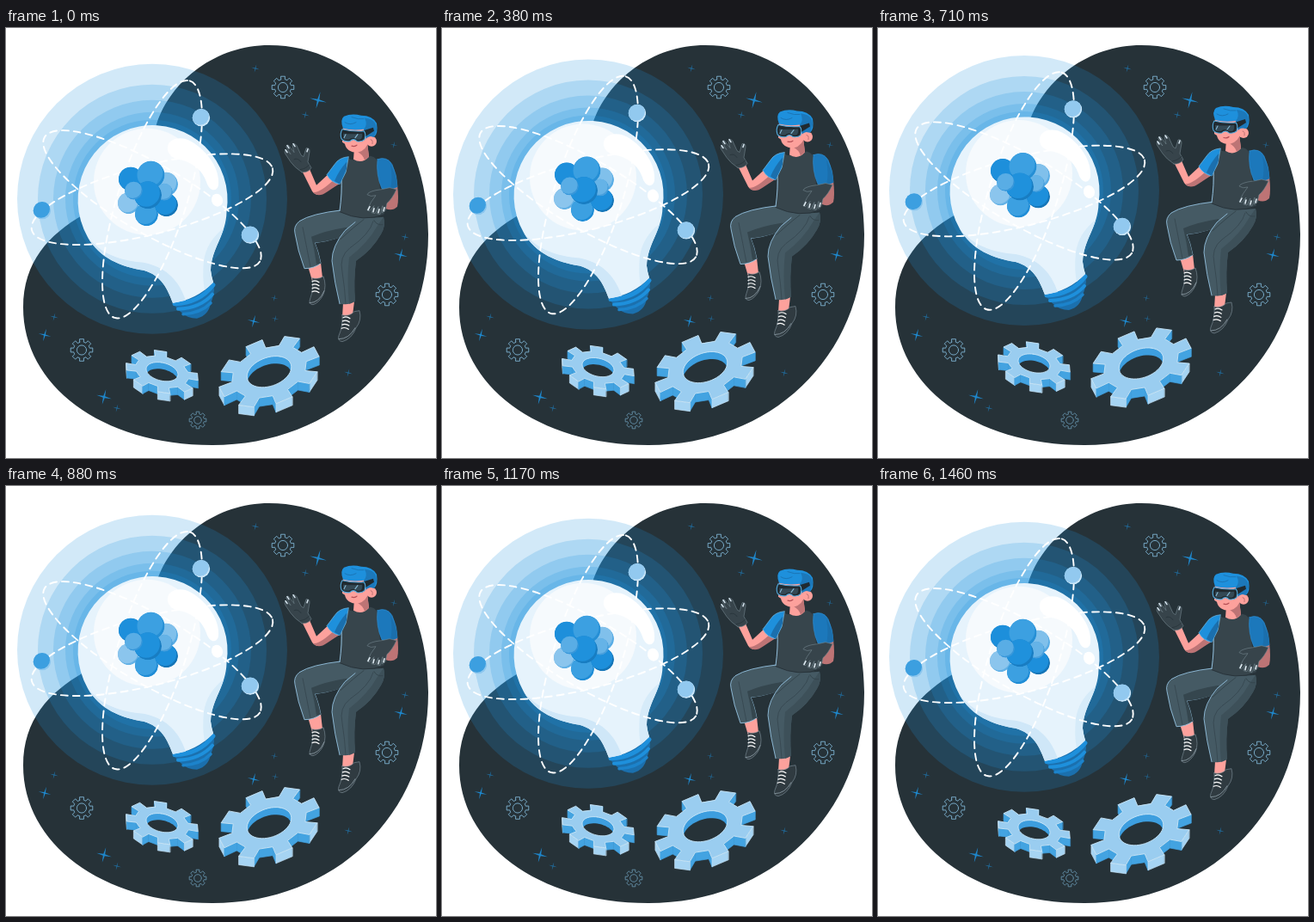
Recreate the animation shown at these times as an HTML page with a canvas. Size 500x500 px, loop 1.5 s.

```html
<!DOCTYPE html>
<html lang="en">
<head>
<meta charset="utf-8">
<title>Floating ideas</title>
<style>
  html, body { margin: 0; width: 100%; height: 100%; overflow: hidden; background: #fff; }
  canvas { display: block; width: 100vw; height: 100vh; }
</style>
</head>
<body>
<canvas id="stage" width="500" height="500"></canvas>
<script>
const ctx = document.getElementById('stage').getContext('2d');
const LOOP = 1500, STEPS = 36, LIFT = 10, BASE = 0.7, TAU = Math.PI * 2;
const DARK = '#263238', BLUE = '#1e90dc', NAVY = '#1b6fad', SKY = '#92c9ef', SKIN = '#fda19c', SKIN_DARK = '#bd7475';
const PANTS = '#455a64', PANTS_DARK = '#35464e', GLOVE = '#37444b', EDGE = '#9fd0f0';

function paint(path, fill, stroke, width = 1) {
  if (fill) { ctx.fillStyle = fill; ctx.fill(path); }
  if (stroke) {
    ctx.strokeStyle = stroke;
    ctx.lineWidth = width;
    ctx.stroke(path);
  }
}
const shape = (d, fill, stroke, width) => paint(new Path2D(d), fill, stroke, width);
const line = (d, stroke, width) => shape(d, null, stroke, width);

function oval(x, y, rx, ry, turn, fill, stroke, width) {
  const path = new Path2D();
  path.ellipse(x, y, rx, ry, turn, 0, TAU);
  paint(path, fill, stroke, width);
}
const disc = (x, y, r, fill, stroke, width) => oval(x, y, r, r, 0, fill, stroke, width);

function polygon(points) {
  const path = new Path2D();
  points.forEach(([x, y]) => path.lineTo(x, y));
  path.closePath();
  return path;
}

// Ball with a crescent of shade on its lower right
function ball(x, y, r, fill, shade) {
  ctx.save();
  ctx.beginPath();
  ctx.arc(x, y, r, 0, TAU);
  ctx.clip();
  disc(x, y, r, shade);
  disc(x - r * 0.13, y - r * 0.16, r, fill);
  ctx.restore();
}

// Gear outline on the unit circle, mapped by the axes a and b
function gearPoints(cx, cy, a, b, root, tipHalf, rootHalf) {
  const points = [];
  for (let i = 0; i < 8; i++) {
    for (const [r, off] of [[root, -rootHalf], [1, -tipHalf], [1, tipHalf], [root, rootHalf]]) {
      const t = i * TAU / 8 + off, c = r * Math.cos(t), s = r * Math.sin(t);
      points.push([cx + a[0] * c + b[0] * s, cy + a[1] * c + b[1] * s]);
    }
  }
  return points;
}

function solidGear(cx, cy, a, b, depth) {
  const points = gearPoints(cx, cy, a, b, 0.74, 0.17, 0.21);
  const walls = points.map((p, i) => ({ p, q: points[(i + 1) % points.length], tip: i % 4 === 1 }))
    .filter(({ p, q }) => q[0] < p[0])
    .sort((u, v) => u.p[1] + u.q[1] - v.p[1] - v.q[1]);
  for (const { p, q, tip } of walls) {
    const wall = polygon([p, q, [q[0], q[1] + depth], [p[0], p[1] + depth]]);
    paint(wall, tip ? '#a6d4f3' : '#43a3e1', tip ? '#c4e2f7' : '#43a3e1', 0.7);
  }
  paint(polygon(points), '#9acdf0', '#c9e6f8', 0.9);

  const hole = new Path2D(), floor = new Path2D();
  for (let i = 0; i < 48; i++) {
    const c = 0.44 * Math.cos(i * TAU / 48), s = 0.44 * Math.sin(i * TAU / 48);
    const x = cx + a[0] * c + b[0] * s, y = cy + a[1] * c + b[1] * s;
    hole.lineTo(x, y);
    floor.lineTo(x, y + depth * 0.85);
  }
  hole.closePath();
  ctx.save();
  ctx.clip(hole);
  paint(hole, '#3d9edf');
  paint(floor, DARK);
  ctx.restore();
  paint(hole, null, '#c9e6f8', 0.9);
}

function lineGear(x, y, r, color) {
  paint(polygon(gearPoints(x, y, [0, -r], [r, 0], 0.74, 0.19, 0.24)), null, color, 0.9);
  disc(x, y, r * 0.43, null, color, 0.9);
}

function sparkle(x, y, r, alpha) {
  ctx.save();
  ctx.translate(x, y);
  ctx.rotate(0.25);
  ctx.scale(r, r);
  ctx.globalAlpha = alpha;
  shape('M0-1L.11-.11 1 0 .11.11 0 1-.11.11-1 0-.11-.11Z', BLUE);
  ctx.restore();
}

function background() {
  ctx.fillStyle = '#fff';
  ctx.fillRect(0, 0, 500, 500);
  shape('M306 20C410 20 491 115 491 240C491 384 381 485 240 485C110 485 20 415 20 325C20 272 50 240 90 217C135 190 160 160 175 112C192 60 245 20 306 20Z', DARK);
  lineGear(322, 69, 13, '#7eb4d3');
  lineGear(443, 310, 13, '#7eb4d3');
  lineGear(88, 374.5, 13, '#7eb4d3');
  lineGear(223, 456, 10, '#648fa8');
  for (const [x, y, r] of [[363, 84, 10], [459, 264, 8], [288, 341, 7.5], [45, 357, 7.5], [114, 429, 9]]) sparkle(x, y, r, 0.9);
  for (const [x, y, r] of [[290, 47, 5], [348, 101, 5], [451, 136, 4.5], [464, 243, 5], [312, 314, 4.5],
    [313, 338, 4.5], [398, 401, 5], [56, 336, 5], [129, 442, 5]]) sparkle(x, y, r, 0.55);
}

function bulb() {
  for (const r of [157, 133, 115, 101, 92]) disc(170, 198, r, 'rgba(30,144,220,.2)');

  shape('M194 317Q221 314 241 293L242 304Q241 313 238 319Q236 333 222 337Q211 337 204 330Q197 325 194 317Z', '#1b70ae');
  line('M196 320Q225 319 241 298', BLUE, 5);
  line('M200 326Q226 325 240 309', BLUE, 4);
  line('M206 332Q226 331 238 319', '#1c83cb', 3.5);

  shape('M95 242.5A87 87 0 1 1 256.5 213C256 240 239 255 238 281Q239 289 241 295Q222 315 194 319C188 303 181 287 160 281C134 277 109 267 95 242.5Z', '#e6f3fc');
  shape('M95 242.5C110 262 134 270 160 272C184 277 200 290 209 316L194 319C188 303 181 287 160 281C134 277 109 267 95 242.5Z', '#cfe7f8');
  shape('M253 232Q233 248 230 270Q228 290 231 304L241 295Q239 289 238 281C239 259 249 248 253 232Z', '#d6ebf9');
  disc(164, 178, 62, '#f6fafd');
  shape('M188 141C186 128 203 124 215 131C236 143 249 165 247 182C245 191 236 189 233 178C228 163 214 154 200 152Q189 149 188 141Z', '#fff');
  oval(245.5, 199.5, 6.5, 7.5, -0.3, '#fff');

  ctx.setLineDash([8, 6]);
  for (const degrees of [30, -14.4, -72.4]) oval(170, 198.5, 144.5, 40, degrees * TAU / 360, null, '#fff', 1.9);
  ctx.setLineDash([]);

  ball(145, 175, 14, '#1d8fdb', '#187dc2');
  ball(142.5, 203, 12.5, '#8bc5ed', '#62b1e6');
  ball(186, 181, 14, '#80c0eb', '#5aade5');
  ball(163.5, 216, 13.5, '#3ca0e1', '#208dd6');
  ball(186.5, 205, 13.5, '#1d8fdb', '#1676b8');
  ball(184, 190, 10, '#65b3e7', '#479fdc');
  ball(168.5, 170, 16, '#3ca0e1', '#258fd5');
  ball(165, 193.5, 16, '#1f91dc', '#187dc2');
  ball(148.5, 188.5, 10.5, '#59ade5', '#3797da');

  ball(227, 103.5, 10.3, SKY, '#c8e5f8');
  ball(284, 240, 10.3, SKY, '#c8e5f8');
  ball(42, 211.5, 10.3, '#3c9fe0', '#8dc7ee');
}

function shoes() {
  shape('M351 276L366 272L368 290L356 293Z', SKIN);
  shape('M392 319L405 317L403 333L391 335Z', SKIN);
  shape('M356 290Q363 292 369 288Q373 299 369 309Q364 319 357 321Q351 321 354 313Q358 303 356 290Z', '#303b41', '#83949e', 0.6);
  line('M353 319Q364 319 370 305', '#9fb0ba', 0.7);
  shape('M391 333Q399 335 405 329L411 328Q414 339 407 348Q402 361 391 364Q385 363 387 357Q392 346 391 333Z', '#303b41', '#83949e', 0.6);
  line('M387 361Q399 361 406 348', '#9fb0ba', 0.7);
  for (let i = 0; i < 4; i++) {
    line(`M356 ${294 + i * 4}q4-2 8 1`, '#fff', 1.2);
    line(`M${392 - i * 0.6} ${336 + i * 4.2}q4-2 8 1`, '#fff', 1.2);
  }
}

function legs() {
  shape('M391 211Q355 215 341 224Q334 230 336 238Q339 258 347 279Q358 279 366 273Q363 258 359 249Q386 246 404 234L412 218Z', PANTS, EDGE, 0.8);
  shape('M396 231Q371 235 355 242Q359 259 361 274L366 273Q363 258 359 249Q386 246 398 238Z', PANTS_DARK);
  line('M345 231Q350 256 354 277', PANTS_DARK, 0.8);
  shape('M394 213Q416 222 439 219Q442 229 436 239Q426 257 407 270Q404 293 406 317Q399 322 388 320Q382 296 379 270Q379 253 394 235L406 225Z', PANTS);
  line('M388 320Q382 296 379 270Q379 253 394 235L406 225', EDGE, 0.8);
  shape('M439 219Q442 229 436 239Q426 257 407 270Q404 293 406 317L399 320Q396 292 399 266Q421 249 432 229Z', '#3d5059');
  line('M427 224Q423 239 400 255Q387 265 391 283Q394 302 395 320', PANTS_DARK, 0.8);
  line('M416 222Q404 231 389 245M428 223q3 6 10 5', PANTS_DARK, 1);
}

function arms() {
  // Raised arm
  shape('M375 169L361 182L352 161L345 167L356 189Q360 195 367 192L388 180Z', SKIN);
  shape('M357 190Q364 192 382 175L388 180L373 190Q363 197 357 190Z', SKIN_DARK);
  shape('M398 149Q387 150 382 158L373 170Q378 179 388 181L395 167Z', BLUE, '#74bdea', 0.7);
  shape('M388 181L396 163L396 155Q387 165 382 177Z', NAVY);
  shape('M344 167Q335 161 331 155L325 146Q323 142 326 141L331 146L326 138Q326 134 329 136L335 144L333 136Q335 132 338 136L343 147L346 149L349 139Q353 138 353 143L351 155L355 162Q351 168 344 167Z', GLOVE, '#75868f', 0.6);
  line('M325 141l2 3M327 136l2 3M334 134l2 3M351 140l-1 3', '#d9e8f2', 1.5);
  line('M335 152q5-2 8 3M342 164q7-1 11-6', '#28343a', 0.8);

  // Lowered arm
  shape('M441 185L455 182Q457 198 455 207Q449 213 441 209Z', SKIN_DARK);
  shape('M432 152Q443 148 449 158Q455 171 455 184Q445 189 437 186Q430 170 432 152Z', '#1c78bb', '#2f93d8', 0.6);
  shape('M447 158Q455 171 455 184L447 187Q450 174 447 158Z', NAVY);
  shape('M454 187L446 185Q438 187 430 188Q421 190 420 193Q424 196 430 194Q424 201 420 211L423 212L428 206L425 214L429 215L433 207L431 215L435 216L438 206L437 214L441 212L443 203Q449 198 454 187Z', GLOVE, '#75868f', 0.6);
  line('M421 211l2-4M427 213l1-4M433 214l1-4M439 212l1-4', '#e3eff6', 1.5);
}

function torso() {
  shape('M396 150Q407 157 424 148Q433 150 433 161Q434 188 440 216Q417 226 388 213Q391 189 388 171Q390 155 396 150Z', '#37454c');
  line('M396 151Q389 156 390 173Q391 190 388 212', EDGE, 0.9);
  line('M388 213Q416 226 440 216', '#263238', 0.9);
}

function head() {
  shape('M405 139L420 133L422 149Q414 158 404 152Z', SKIN);
  shape('M408 143Q416 140 420 131L422 149L417 153Q415 146 408 143Z', SKIN_DARK);
  disc(425, 131, 6, SKIN);
  line('M424 129q3 0 2 5', SKIN_DARK, 1);
  shape('M392 113L419 113L424 127Q419 142 409 144Q396 144 394 134L391 132Z', SKIN);
  line('M402 136.5q4 1 6-1', '#b54f55', 1.2);
  shape('M392 116Q388 106 393 102Q402 98 413 101Q426 101 431 110Q433 122 428 126Q421 124 419 128L416 117Q403 119 392 116Z', BLUE);
  shape('M417 104Q431 105 431 117L428 126Q421 124 419 128L416 117Q421 112 417 104Z', '#1c78ba');
  line('M394 109q6 4 13 0M402 103q8 3 14 2', NAVY, 0.8);
  shape('M414 119L427 115L428 119L417 126Z', '#202a30');
  shape('M391 117Q403 120 416 119Q419 122 417 129Q414 132 408 131Q404 127 400 131Q393 132 390 128Q388 122 391 117Z', '#202a30', '#54acdf', 1.1);
  shape('M392 122Q403 123 414 122Q415 127 412 129L408 129Q403 125 399 129L393 129Z', '#344955');
  line('M395 123l-2 4M409 123l-3 4', '#86b9d5', 1.1);
}

// The scene rises and sinks at an even pace, drawn at 24 frames a second;
// the first and last steps share the resting pose.
function lift(time) {
  const step = Math.floor((time + 4) * STEPS / LOOP) % STEPS;
  return LIFT * (1 - Math.abs(1 - 2 * step / (STEPS - 1)));
}

function render(time) {
  background();
  ctx.save();
  ctx.translate(0, BASE - lift(time));
  bulb();
  solidGear(181.5, 399, [-2, -24.5], [42, 6], 9);
  solidGear(306, 399, [27, -40.5], [52, 7], 10);
  shoes();
  legs();
  torso();
  arms();
  head();
  ctx.restore();
}

ctx.lineJoin = ctx.lineCap = 'round';
const start = performance.now();
function tick() {
  render(performance.now() - start);
  requestAnimationFrame(tick);
}
tick();
</script>
</body>
</html>
```
